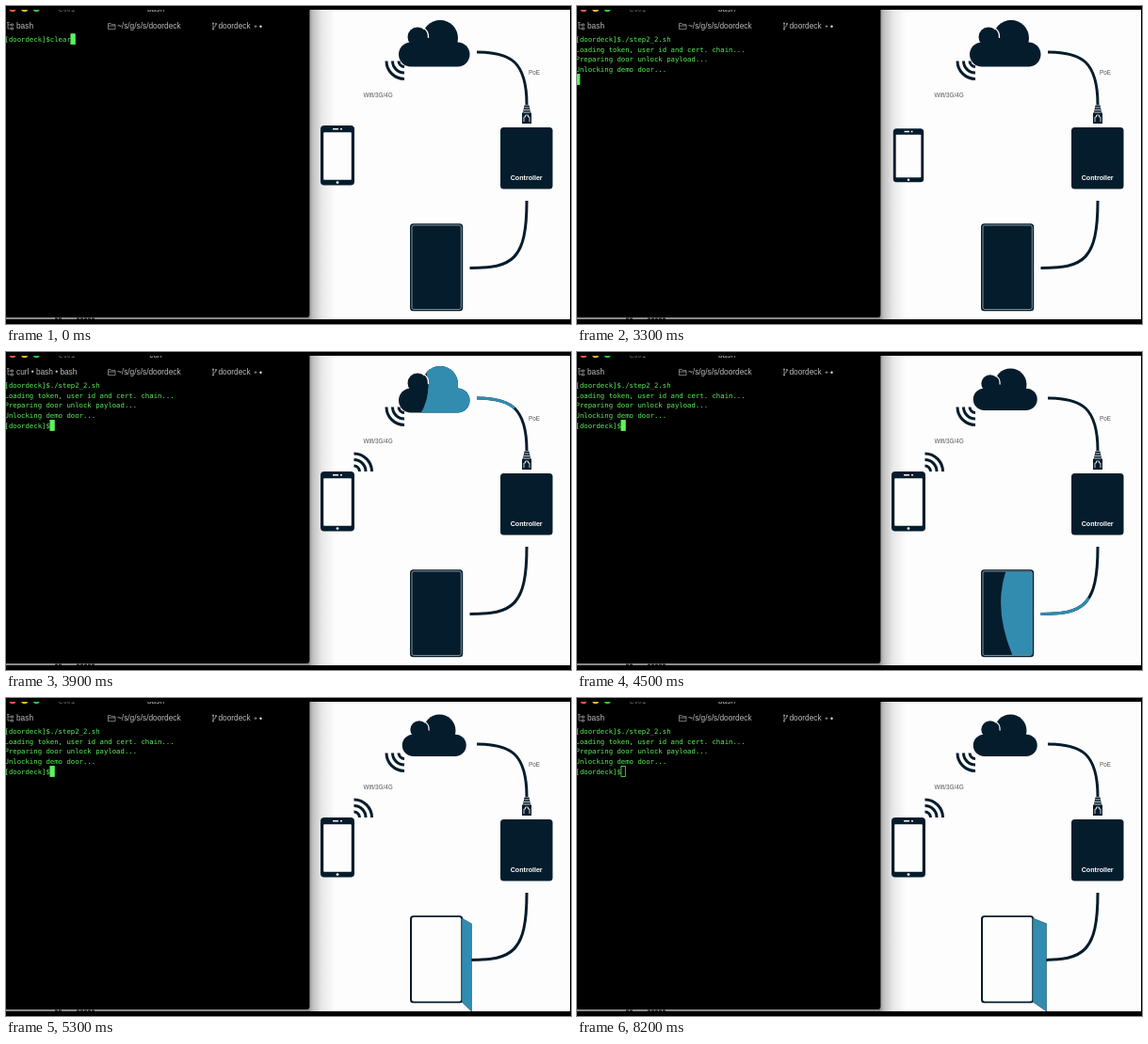
An HTML page that plays this animation: 600 by 338 pixels, repeating every 8.3 s.

```html
<!DOCTYPE html>
<html lang="en">
<head>
<meta charset="utf-8">
<title>Door unlock demo</title>
<style>
  html, body { margin: 0; width: 100%; height: 100%; overflow: hidden; background: #000; }
  svg { display: block; width: 100%; height: 100%; }
  text { white-space: pre; }
  .ui { font: 8.3px "Liberation Sans", Arial, sans-serif; fill: #bdbdbd; }
  .mono { font: 7.31px "DejaVu Sans Mono", monospace; fill: #58ec56; }
  .label { font: 6.4px "Liberation Sans", Arial, sans-serif; fill: #555; }
  .line { fill: none; stroke: currentColor; stroke-width: 3; }
  .icon { fill: none; stroke: #999; stroke-width: .8; }
  .navy { color: #051c2c; }
  .blue { color: #318cb0; }
  .solid { fill: currentColor; }
</style>
</head>
<body>
<svg viewBox="0 0 600 338" preserveAspectRatio="none">
  <defs>
    <linearGradient id="shade">
      <stop offset="0" stop-color="#999"/>
      <stop offset=".15" stop-color="#c2c2c2"/>
      <stop offset=".5" stop-color="#e8e8e8"/>
      <stop offset="1" stop-color="#fdfdfd"/>
    </linearGradient>
    <g id="cloudShape" class="solid">
      <rect x="417" y="38.500" width="75.500" height="26" rx="13"/>
      <circle cx="461" cy="34" r="19"/>
      <circle cx="437" cy="33" r="10.500"/>
    </g>
    <g id="controllerShape" class="solid">
      <path d="M550.500 105.500h5l1.500 8h1v11.500h-10v-11.500h1z"/>
      <rect x="525" y="129" width="55.500" height="65.500" rx="3.500"/>
    </g>
    <path id="cableIn" class="line" pathLength="90" d="M500 49C536 49 553 59 553 105"/>
    <path id="cableOut" class="line" pathLength="110" d="M553 207C553 270 538 278.500 492.500 278.500"/>
    <g id="waves" class="line">
      <path d="M417 58.500A6 6 0 0 0 423 64.500"/>
      <path d="M410.500 58.500A12.500 12.500 0 0 0 423 71"/>
      <path d="M404 58.500A19 19 0 0 0 423 77.500"/>
    </g>
    <clipPath id="cloudBand"><path id="cloudBandPath"/></clipPath>
    <clipPath id="boxBand"><rect id="boxBandRect" x="520" width="65"/></clipPath>
    <clipPath id="panel"><rect x="431.500" y="233.500" width="52" height="88.500" rx="1.500"/></clipPath>
  </defs>

  <rect width="599" height="338" fill="#fdfdfd"/>
  <rect x="322" width="27" height="334" fill="url(#shade)"/>
  <rect y="329" width="322" height="5" fill="#8a8a8a"/>
  <path d="M75 332.300h19M52 332.300h7" stroke="#222" stroke-width="1.500" stroke-dasharray="3 1"/>

  <!-- terminal -->
  <path d="M0 0H322.400V328a3 3 0 0 1-3 3H0z"/>
  <circle cx="7" cy="2.500" r="3.700" fill="#f4574f"/>
  <circle cx="19.700" cy="2.500" r="3.700" fill="#f5b52e"/>
  <circle cx="32.300" cy="2.500" r="3.700" fill="#32c445"/>
  <text class="ui" x="51" y="6" style="fill: #666">⌥⌘1</text>
  <text id="title" class="ui" x="159" y="6.300" text-anchor="middle"></text>
  <path class="icon" d="M2 17.500v6.500h4M2 20h4M1 17.500h2.500M5.500 19h2v2h-2zM5.500 23h2v2h-2z"/>
  <text id="tab" class="ui" x="11" y="24.300"></text>
  <path class="icon" d="M108.500 18.500h2.700l1 1.200h3.800v5h-7.500zM108.500 21h7.500"/>
  <text class="ui" x="118" y="24.300">~/s/g/s/s/doordeck</text>
  <path class="icon" d="M220 19v5M220 22.500q3 0 3-3"/>
  <g fill="#999"><circle cx="220" cy="18.500" r="1"/><circle cx="220" cy="24.500" r="1"/><circle cx="223" cy="19" r="1"/></g>
  <text class="ui" x="225.500" y="24.300">doordeck</text>
  <path class="icon" d="M263.500 21.700h3M265 20.200v3"/>
  <circle cx="270.500" cy="21.700" r="1.200" fill="#ddd"/>
  <g id="lines"></g>
  <rect id="cursor" width="4.400" height="11" stroke="#5cf35a" stroke-width=".8"/>

  <!-- diagram -->
  <g class="navy">
    <g id="cloud">
      <use href="#cloudShape"/>
      <use href="#cloudShape" class="blue" clip-path="url(#cloudBand)"/>
      <path d="M442 22.500A11.500 11.500 0 0 1 448.500 34" fill="none" stroke="#fdfdfd" stroke-width="1.300"/>
    </g>
    <use href="#waves"/>
    <g id="phoneWaves"></g>
    <use href="#cableIn"/>
    <use id="pulseIn" href="#cableIn" class="blue"/>
    <use href="#cableOut"/>
    <use id="pulseOut" href="#cableOut" class="blue"/>
    <use href="#controllerShape"/>
    <use href="#controllerShape" class="blue" clip-path="url(#boxBand)"/>
    <path d="M550.500 108h5M550 110.500h6M549.500 113h7M550 123v-5h1.500v-2h3v2h1.500v5" fill="none" stroke="#fdfdfd" stroke-width=".8"/>
    <g id="phone">
      <rect class="solid" x="334" y="127" width="36" height="63.500" rx="4"/>
      <rect x="337.200" y="134.300" width="29.600" height="50.500" rx=".8" fill="#fdfdfd"/>
      <path d="M347 130.700h6M355 130.700h2" stroke="#fdfdfd" stroke-width="1.500"/>
      <circle cx="352" cy="187.600" r="1.400" fill="#fdfdfd"/>
    </g>
    <rect class="solid" x="429" y="231.300" width="56.200" height="93" rx="3.500"/>
    <rect id="panelFill" x="431" y="233" width="52.300" height="89.500" rx="2"/>
    <path id="panelBlue" class="blue solid" clip-path="url(#panel)"/>
    <path id="leaf" class="blue solid" stroke="#051c2c" stroke-width=".4" stroke-linejoin="round"/>
  </g>
  <text class="label" x="379.500" y="97.300">Wifi/3G/4G</text>
  <text class="label" x="555" y="73.200">PoE</text>
  <text x="552.700" y="184.500" text-anchor="middle" fill="#fff"
        style="font: bold 7.1px 'Liberation Sans', Arial, sans-serif">Controller</text>

  <rect width="600" height="4"/>
  <rect y="333" width="600" height="5"/>
</svg>

<script>
const LOOP = 8300, STEP = 100;
const CHAR = 4.4, ROW = 10.7, LEFT = -1.5;
const NAVY = '#051c2c', PAPER = '#fdfdfd';
const $ = id => document.getElementById(id);
const set = (id, attrs) => {
  for (const key in attrs) $(id).setAttribute(key, attrs[key]);
};
const clamp = (v, lo = 0, hi = 1) => Math.min(hi, Math.max(lo, v));
const rowY = row => 38 + row * ROW;
const scaleAbout = (x, y, s) => `translate(${x} ${y}) scale(${s}) translate(${-x} ${-y})`;

const PROMPT = '[doordeck]$';
const OUTPUT = [
  [2400, 'Loading token, user id and cert. chain...'],
  [2500, 'Preparing door unlock payload...'],
  [2600, 'Unlocking demo door...'],
  [3600, PROMPT]
];

const make = (parent, tag, attrs) => {
  const node = document.createElementNS('http://www.w3.org/2000/svg', tag);
  for (const key in attrs) node.setAttribute(key, attrs[key]);
  return parent.appendChild(node);
};
const rows = Array.from({ length: 5 }, (_, i) =>
  make($('lines'), 'text', { class: 'mono', x: LEFT, y: rowY(i) }));

// The phone's waves mirror the cloud's, one path each so they can appear in turn.
$('phoneWaves').setAttribute('transform', 'rotate(180 396.250 92.750)');
const phoneWaves = [...$('waves').children].map(arc =>
  make($('phoneWaves'), 'path', { class: 'line', d: arc.getAttribute('d') }));

function drawTerminal(t) {
  const command = t < 200 ? 'clear' : t < 300 ? '' : './step2_2.sh';
  const shown = [PROMPT + command, ...OUTPUT.filter(([at]) => t >= at).map(([, s]) => s)];
  rows.forEach((row, i) => { row.textContent = shown[i] || ''; });

  const running = t >= 2400 && t < 3600;
  const row = running ? shown.length : shown.length - 1;
  const column = running ? 0 : shown[row].length;
  set('cursor', {
    x: LEFT + column * CHAR,
    y: rowY(row) - 8.3,
    fill: t >= 8200 ? 'none' : '#5cf35a'
  });

  const busy = t >= 3400 && t < 4200;
  $('title').textContent = busy ? 'curl' : 'bash';
  $('tab').textContent = busy ? 'curl • bash • bash' : 'bash';
}

// Blue stretch of a cable that starts at a given distance along the route.
function drawPulse(id, start, length, head, tail) {
  const from = clamp(tail - start, 0, length), to = clamp(head - start, 0, length);
  set(id, {
    'stroke-dasharray': `0 ${from} ${to - from} 999`,
    visibility: to > from ? 'visible' : 'hidden'
  });
}

function drawDoor(t, head) {
  const p = clamp((t - 4600) / 800);
  const angle = p * p * (3 - 2 * p) * 106 * Math.PI / 180;
  const opening = p > 0;
  set('panelFill', { fill: opening ? PAPER : NAVY, stroke: opening ? 'none' : '#b8c4cc', 'stroke-width': .7 });

  const edge = 484 - (head - 392);
  set('panelBlue', {
    d: `M${edge + 5} 231Q${edge - 10} 274 ${edge + 13} 326H490V231z`,
    visibility: head > 392 && !opening ? 'visible' : 'hidden'
  });

  const x = 484 - 53 * Math.cos(angle), lean = Math.sin(angle);
  set('leaf', {
    d: `M484 234L${x} ${234 + 6 * lean}V${323 + 10.5 * lean}L484 323z`,
    visibility: opening ? 'visible' : 'hidden'
  });
}

function draw(t) {
  drawTerminal(t);

  const phoneScale = t < 3300 ? 1 : clamp(.9 + (t - 3300) / 2000, .9, 1);
  set('phone', { transform: scaleAbout(352, 158.7, phoneScale) });
  phoneWaves.forEach((arc, i) =>
    arc.setAttribute('visibility', t >= 3500 + i * 100 ? 'visible' : 'hidden'));

  // One pulse runs at constant speed from the cloud to the door.
  const head = 125 + (t - 3900) / 2, tail = head - 95;
  const from = 416 + clamp(tail, -30, 100), to = 416 + clamp(head, -30, 100);
  set('cloudBandPath', {
    d: `M${from - 4} 12Q${from + 10} 38 ${from - 6} 66H${to - 6}Q${to + 10} 38 ${to - 4} 12z`
  });
  set('cloud', { transform: scaleAbout(454.7, 40, clamp(1 - (t - 3900) / 2000, .9, 1)) });

  drawPulse('pulseIn', 83, 90, head, tail);
  const top = clamp(tail - 173, 0, 90), bottom = clamp(head - 173, 0, 90);
  set('boxBandRect', { y: 106 + top, height: bottom - top });
  drawPulse('pulseOut', 275, 110, head, tail);
  drawDoor(t, head);
}

let start;
function frame(now) {
  start ??= now;
  draw(Math.floor((now - start) % LOOP / STEP) * STEP);
  requestAnimationFrame(frame);
}
draw(0);
requestAnimationFrame(frame);
</script>
</body>
</html>
```
